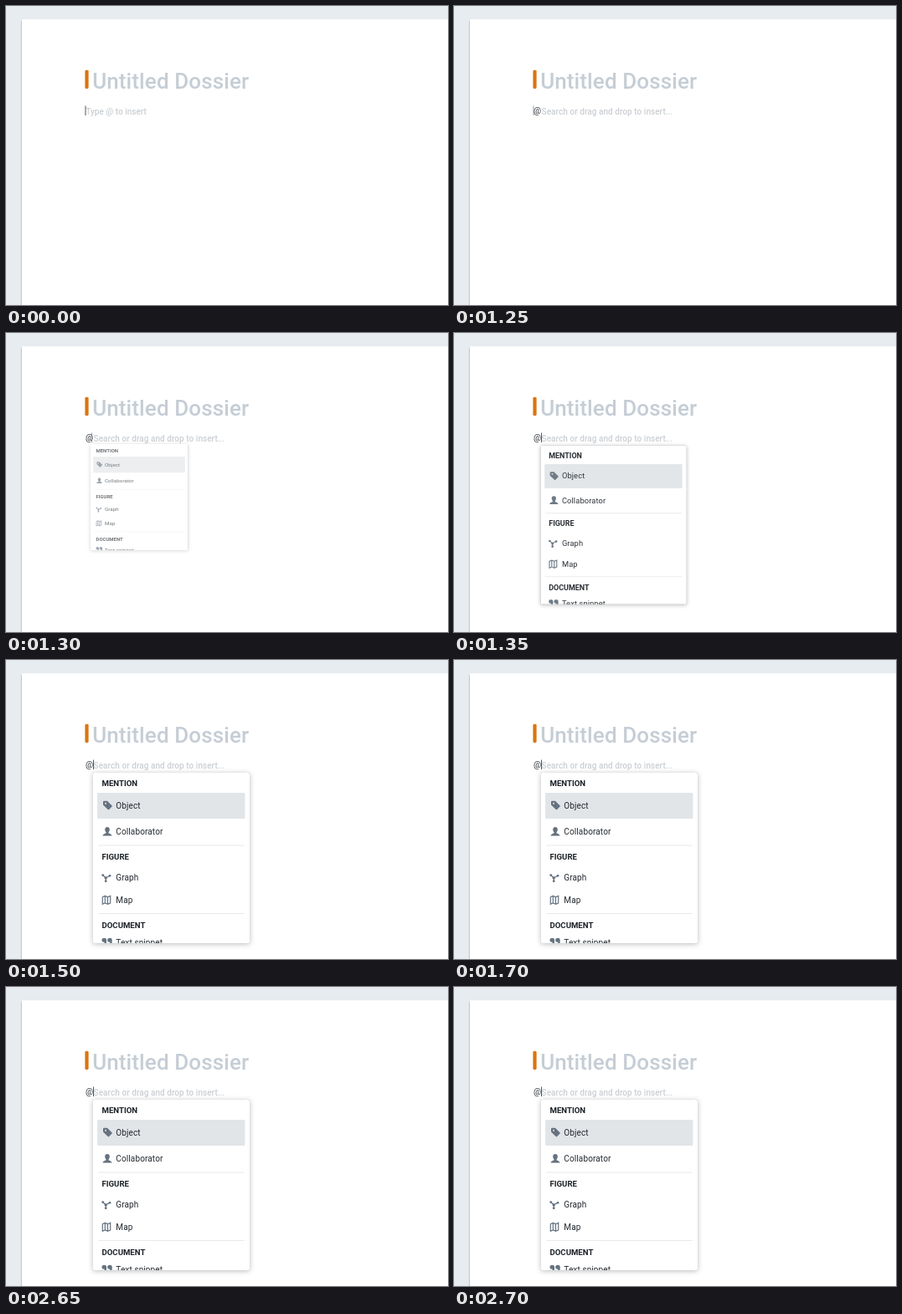
An HTML page that plays this animation: 528x358 px, repeating every 3.05 s.

```html
<!DOCTYPE html>
<html lang="en">
<head>
<meta charset="utf-8">
<title>Insert menu</title>
<style>
  html, body { margin: 0; width: 100%; height: 100%; overflow: hidden; background: #e7ecf0; }
  svg { display: block; width: 528px; height: 358px; font: 500 10px Roboto, sans-serif; }
  .page { fill: #fff; filter: drop-shadow(0 2px 1px rgba(16, 22, 26, .45)); }
  .title { font-size: 26px; fill: #c5cdd5; letter-spacing: .1px; }
  .hint { fill: #cbcfd3; }
  .typed { font-weight: 400; fill: #30363c; }
  .card { fill: #fff; filter: drop-shadow(0 .5px .6px rgba(16, 22, 26, .45)) drop-shadow(0 1.5px 3px rgba(16, 22, 26, .3)); }
  .head { font-size: 9.6px; font-weight: 700; fill: #1c2127; }
  .item { font-weight: 400; fill: #22282e; letter-spacing: .12px; }
  .rule { stroke: #e8eaec; }
  .icon { fill: #65727f; }
  .line { fill: none; stroke: #65727f; stroke-width: 1.2; }
</style>
</head>
<body>
<svg viewBox="0 0 528 358">
  <defs><clipPath id="inside"><rect x="104" y="135" width="187" height="204" rx="1.5"/></clipPath></defs>
  <rect class="page" x="19" y="16" width="530" height="370"/>
  <rect x="94.4" y="76.7" width="4.2" height="22.3" rx="1.4" fill="#da7410"/>
  <text class="title" x="103.2" y="98.5">Untitled Dossier</text>

  <text id="empty" class="hint" x="95.3" y="129.8">Type @ to insert</text>
  <g id="query">
    <text class="typed" x="95" y="129">@</text>
    <text class="hint" x="104.6" y="129.8" letter-spacing=".04">Search or drag and drop to insert...</text>
  </g>
  <rect id="caret" y="119.5" width="1" height="11.5" fill="#50565c"/>

  <g id="menu">
    <rect class="card" x="104" y="135" width="187" height="204" rx="1.5"/>
    <g clip-path="url(#inside)">
      <rect x="109" y="159" width="176.5" height="31" rx="1.5" fill="#e2e5e8"/>
      <path class="rule" d="M110 222H285M110 303.5H285"/>

      <text class="head" x="114.5" y="151.4">MENTION</text>
      <text class="head" x="114.5" y="238.8">FIGURE</text>
      <text class="head" x="114.5" y="320.6">DOCUMENT</text>

      <text class="item" x="131.3" y="177.5">Object</text>
      <text class="item" x="131.3" y="209">Collaborator</text>
      <text class="item" x="131.3" y="263.8">Graph</text>
      <text class="item" x="131.3" y="291.2">Map</text>
      <text class="item" x="131.3" y="341.5">Text snippet</text>

      <path class="icon" fill-rule="evenodd" d="M116 169.8q0-1 1-1h4l5.5 5.4q.7.7 0 1.4l-3.4 3.4q-.7.7-1.4 0L116 173.6zM118 171.7a1 1 0 1 0 2 0a1 1 0 1 0-2 0"/>
      <path class="icon" d="M121 200c2 0 3 1.3 2.8 3.2-.1 1.4-.7 2.4-1.3 3.1v1c1.5.8 3.8 1.2 4 3.2h-11c.2-2 2.5-2.4 4-3.2v-1c-.6-.7-1.2-1.7-1.3-3.1-.2-1.9.8-3.2 2.8-3.2"/>
      <path class="line" d="M115.5 257.5l3.7 3.3 4.8-2.6M119.2 260.8v4"/>
      <g class="icon">
        <circle cx="115.7" cy="257.6" r="1.4"/>
        <circle cx="119.2" cy="260.9" r="1.7"/>
        <circle cx="124" cy="258.3" r="1.4"/>
        <circle cx="119.2" cy="264.8" r="1.4"/>
      </g>
      <path class="line" d="M115.3 283.8l3-1.4 3.2 1.4 3.2-1.4v8.6l-3.2 1.4-3.2-1.4-3 1.4zM118.3 282.4v8.6M121.5 283.8v8.6"/>
      <path id="quote" class="icon" d="M114.5 335q0-2 2-2h1.5q2 0 2 2v2.5q0 3-4 4v-1.5q1.6-.6 1.6-2.2h-1.1q-2 0-2-1.8z"/>
      <use href="#quote" x="6.7"/>
    </g>
  </g>
</svg>
<script>
const LOOP = 3050, TICK = 50, TYPED = 1250, OPEN = 1300, GROW = 145;
const [empty, query, caret, menu] =
  ["empty", "query", "caret", "menu"].map(id => document.getElementById(id));
const show = (el, on) => el.setAttribute("visibility", on ? "visible" : "hidden");

function draw() {
  const now = performance.now() % LOOP;
  const t = Math.floor(now / TICK) * TICK;
  show(empty, t < TYPED);
  show(query, t >= TYPED);
  show(menu, t >= OPEN);
  caret.setAttribute("x", t < OPEN ? 94.5 : t < OPEN + TICK ? 102 : 104);
  caret.setAttribute("opacity", t >= TYPED && t < OPEN + TICK ? .6 : 1);

  // The menu grows out of the line start with an ease-out, in whole ticks.
  const u = Math.min(1, Math.max(0, (t - OPEN + TICK) / GROW));
  const scale = 1 - (1 - u) ** 2.3;
  menu.setAttribute("transform", `translate(96 130) scale(${scale}) translate(-96 -130)`);
  menu.setAttribute("opacity", scale);
  requestAnimationFrame(draw);
}
draw();
</script>
</body>
</html>
```
